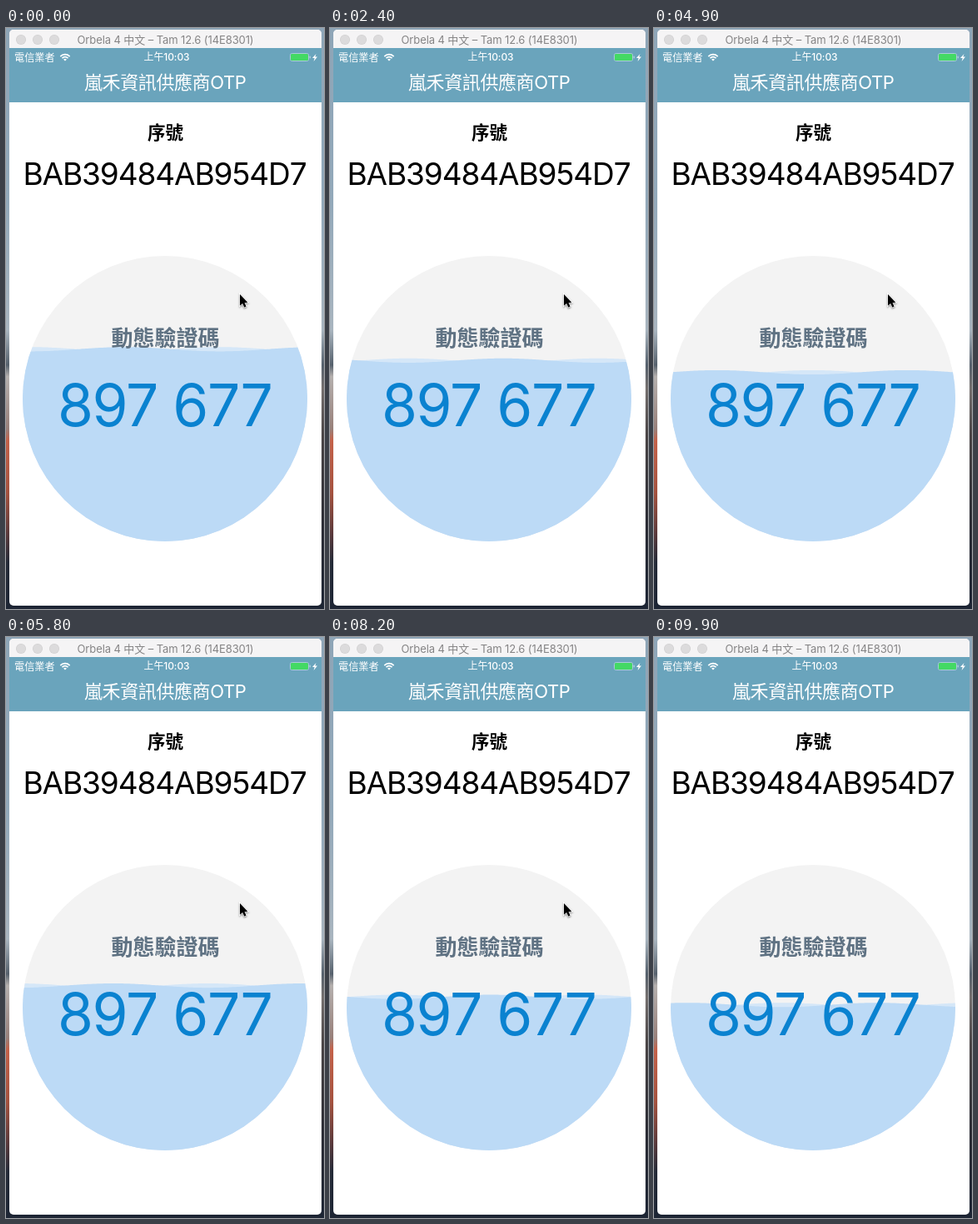
Recreate the animation shown at these times as an HTML page with a canvas. Size 382 by 696 pixels, loop 10000 ms.

```html
<!DOCTYPE html>
<html lang="zh-Hant">
<head>
<meta charset="utf-8">
<title>OTP</title>
<style>
html, body { margin: 0; width: 100%; height: 100%; overflow: hidden; }
canvas { display: block; }
</style>
</head>
<body>
<canvas id="stage" width="382" height="696"></canvas>
<script>
const ctx = document.getElementById('stage').getContext('2d');
const W = 382, H = 696, LOOP = 10000, STEP = 100;
const LATIN = 'Inter, "Noto Sans CJK TC", "Noto Sans CJK", sans-serif';
const CJK = '"Noto Sans CJK TC", "Noto Sans CJK", sans-serif';
const dial = { x: 191, y: 444, r: 171 };
const wave = { length: 228, height: 2.6, speed: 312, crest: 143 };

function text(str, x, y, size, color, opt = {}) {
  ctx.font = `${opt.weight || 400} ${size}px ${opt.font || LATIN}`;
  ctx.letterSpacing = (opt.spacing || 0) + 'px';
  ctx.textAlign = opt.align || 'center';
  ctx.fillStyle = color;
  ctx.fillText(str, x, y);
}

function disc(x, y, r, color) {
  ctx.beginPath();
  ctx.arc(x, y, r, 0, Math.PI * 2);
  ctx.fillStyle = color;
  ctx.fill();
}

function box(x, y, w, h, r, color) {
  ctx.beginPath();
  ctx.roundRect(x, y, w, h, r);
  ctx.fillStyle = color;
  ctx.fill();
}

function poly(points, fill, stroke) {
  ctx.beginPath();
  points.forEach(([x, y]) => ctx.lineTo(x, y));
  ctx.closePath();
  if (stroke) {
    ctx.strokeStyle = stroke;
    ctx.lineWidth = 2;
    ctx.stroke();
  }
  ctx.fillStyle = fill;
  ctx.fill();
}

function fade(x, w, stops) {
  const g = ctx.createLinearGradient(0, 0, 0, H);
  stops.forEach(([at, color]) => g.addColorStop(at, color));
  ctx.fillStyle = g;
  ctx.fillRect(x, 0, w, H);
}

function desktop() {
  const sky = [[0, '#8ea5b7'], [0.3, '#93a9ba'], [0.52, '#a9b5bf'], [0.58, '#56616d']];
  fade(0, W / 2, [...sky, [0.6, '#b5b0ae'], [0.69, '#98807a'], [0.71, '#c4624a'],
    [0.8, '#a4523f'], [0.87, '#5b3a3c'], [0.92, '#252b38'], [1, '#1d2534']]);
  fade(W / 2, W / 2, [...sky, [0.62, '#75706f'], [0.7, '#4a4546'],
    [0.85, '#2c2d35'], [1, '#1d2534']]);
}

function wifi(x, y) {
  ctx.strokeStyle = '#fff';
  ctx.lineWidth = 1.7;
  for (const r of [4.8, 7.8]) {
    ctx.beginPath();
    ctx.arc(x, y, r, -Math.PI * 0.76, -Math.PI * 0.24);
    ctx.stroke();
  }
  ctx.beginPath();
  ctx.moveTo(x, y);
  ctx.arc(x, y, 2.6, -Math.PI * 0.76, -Math.PI * 0.24);
  ctx.fillStyle = '#fff';
  ctx.fill();
}

function battery() {
  ctx.beginPath();
  ctx.roundRect(341.5, 30.5, 22, 9, 2);
  ctx.strokeStyle = '#a9cbd9';
  ctx.lineWidth = 1;
  ctx.stroke();
  box(342, 31, 21, 8, 1.5, '#43d964');
  box(364.5, 33.5, 1.5, 3, 1, '#a9cbd9');
  poly([[372.5, 31], [368, 36], [370.7, 36], [369.6, 40], [374, 34.6], [371.3, 34.6]], '#fff');
}

function chrome() {
  box(4, 2, 375, 690, 5, '#fff');
  box(4, 2, 375, 22, [5, 5, 0, 0], '#f5f4f5');
  for (const x of [18, 38, 58]) {
    disc(x, 14, 6, '#cfcecf');
    disc(x, 14, 5.4, '#dcdbdc');
  }
  text('Orbela 4 中文 – Tam 12.6 (14E8301)', 191.5, 19, 13, '#858485', { spacing: -0.1 });
  ctx.fillStyle = '#6aa4bc';
  ctx.fillRect(4, 24, 375, 65);
  text('電信業者', 10, 39.5, 12.2, '#fff', { align: 'left', font: CJK });
  wifi(71, 39.5);
  text('上午10:03', 193, 39.3, 12, '#fff', { weight: 500, spacing: -0.1 });
  battery();
  text('嵐禾資訊供應商OTP', 191.2, 72.8, 22, '#fff', { spacing: -0.4 });
}

function surface(level, crest, color) {
  const k = Math.PI * 2 / wave.length;
  ctx.beginPath();
  ctx.moveTo(0, H);
  for (let x = 0; x <= W; x += 2) {
    ctx.lineTo(x, level - wave.height * Math.cos(k * (x - crest)));
  }
  ctx.lineTo(W, H);
  ctx.fillStyle = color;
  ctx.fill();
}

function gauge(t) {
  const level = 384.8 + 5.65 * t;
  const crest = wave.crest + wave.speed * t;
  disc(dial.x, dial.y, dial.r, '#f3f3f3');
  ctx.save();
  ctx.beginPath();
  ctx.arc(dial.x, dial.y, dial.r, 0, Math.PI * 2);
  ctx.clip();
  surface(level, crest + wave.length / 2, '#d5e7f8');
  surface(level, crest, '#bcdaf6');
  ctx.restore();
}

function pointer() {
  ctx.save();
  ctx.shadowColor = 'rgba(0,0,0,.35)';
  ctx.shadowBlur = 2;
  ctx.shadowOffsetY = 1;
  poly([[281, 319], [281, 332.6], [284.2, 329.7], [286.3, 334.5],
        [288.5, 333.5], [286.4, 328.9], [290.3, 328.7]], '#000', '#fff');
  ctx.restore();
}

function draw(ms) {
  desktop();
  chrome();
  text('序號', 191.5, 132.5, 21.5, '#000', { weight: 700, font: CJK });
  text('BAB39484AB954D7', 190.5, 188, 37, '#000', { spacing: -1.1 });
  gauge(ms / 1000);
  text('動態驗證碼', 191.5, 381, 26, '#5f7283', { weight: 700, font: CJK });
  text('897 677', 190.7, 477, 69.5, '#0a82d0', { spacing: -1.3 });
  if (ms < 9000) pointer();
}

function tick() {
  const ms = performance.now() % LOOP;
  draw(Math.floor(ms / STEP) * STEP);
  requestAnimationFrame(tick);
}
tick();
</script>
</body>
</html>
```
